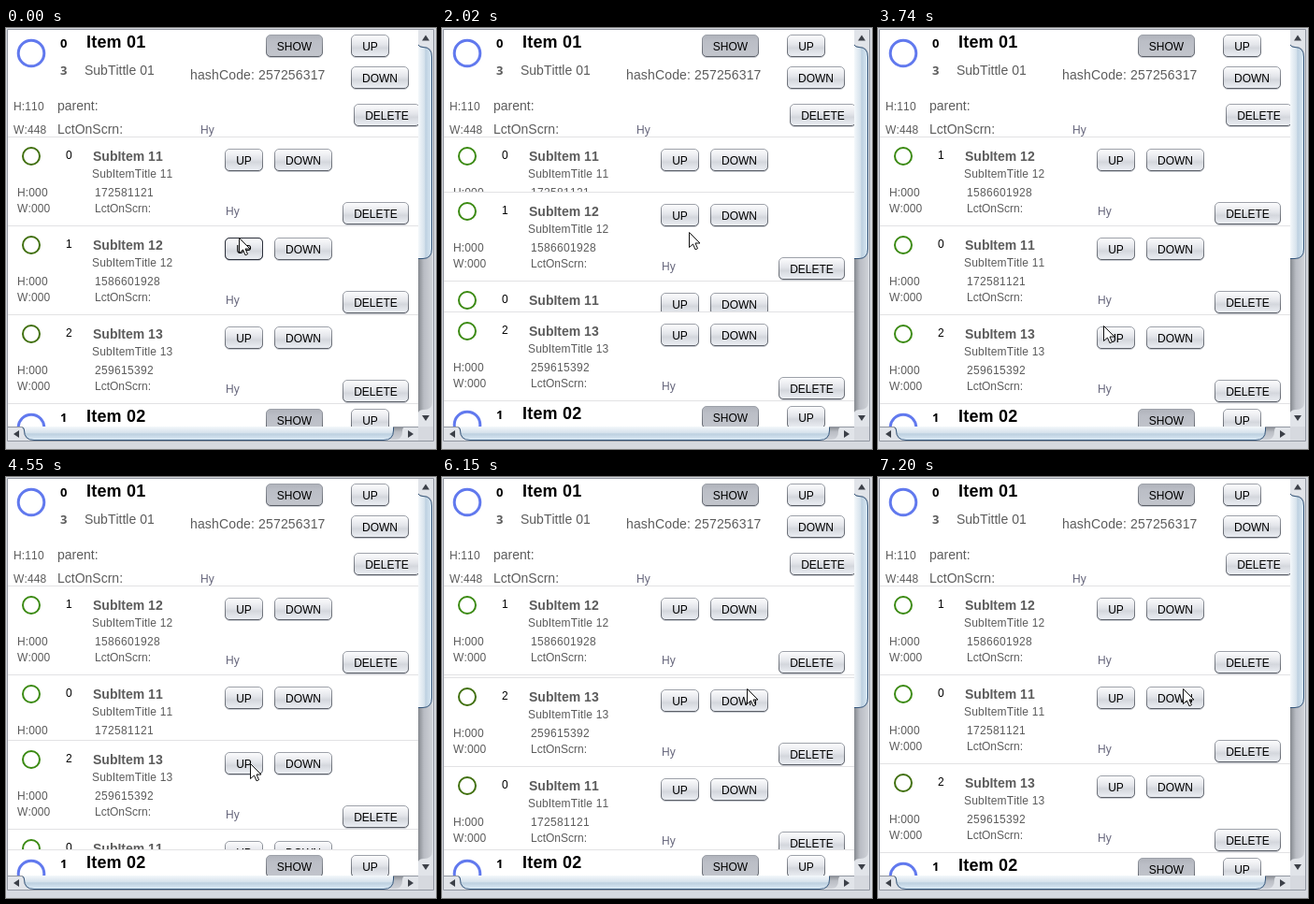
These frames come from a looping animation (460 by 450 pixels, 7800 ms). An HTML page:

```html
<!DOCTYPE html>
<html lang="en">
<head>
<meta charset="utf-8">
<title>Item list</title>
<style>
  html, body { margin: 0; width: 100%; height: 100%; overflow: hidden; background: #d6d9df; }
  svg { display: block; width: 460px; height: 450px; }
  text {
    font: 12px "Liberation Sans", Arial, sans-serif;
    font-kerning: none;
    fill: #5c5c5c;
    white-space: pre;
  }
  .mid { font-size: 14px; }
  .wide { letter-spacing: .15px; }
  .num { letter-spacing: .33px; }
  .title { font-size: 18px; font-weight: bold; fill: #000; letter-spacing: .2px; }
  .sub { font-size: 14px; font-weight: bold; }
  .index { font: bold 13px "Noto Sans", sans-serif; }
  .dark, .label { fill: #000; }
  .label { text-anchor: middle; }
  .hy { fill: #66667c; }
</style>
</head>
<body>
<svg viewBox="0 0 460 450">
  <defs>
    <linearGradient id="face" x2="0" y2="1">
      <stop stop-color="#fdfdfe"/><stop offset=".45" stop-color="#e3e5ea"/>
      <stop offset=".6" stop-color="#d4d7dd"/><stop offset="1" stop-color="#eceff4"/>
    </linearGradient>
    <linearGradient id="edge" x2="0" y2="1">
      <stop stop-color="#9da1a9"/><stop offset="1" stop-color="#5b5f67"/>
    </linearGradient>
    <linearGradient id="on" x2="0" y2="1">
      <stop stop-color="#b0b3bb"/><stop offset=".3" stop-color="#bbbec6"/><stop offset="1" stop-color="#c2c5cc"/>
    </linearGradient>
    <linearGradient id="down" x2="0" y2="1">
      <stop stop-color="#747983"/><stop offset=".3" stop-color="#9da2ab"/><stop offset="1" stop-color="#c3c7cf"/>
    </linearGradient>
    <linearGradient id="thumbH" x2="0" y2="1">
      <stop stop-color="#f4f8fb"/><stop offset=".45" stop-color="#d6e2ec"/>
      <stop offset=".55" stop-color="#bdd0e0"/><stop offset="1" stop-color="#dcebf6"/>
    </linearGradient>
    <linearGradient id="thumbV">
      <stop stop-color="#f4f8fb"/><stop offset=".45" stop-color="#d6e2ec"/>
      <stop offset=".55" stop-color="#bdd0e0"/><stop offset="1" stop-color="#dcebf6"/>
    </linearGradient>
    <linearGradient id="trackH" x2="0" y2="1">
      <stop stop-color="#85898f"/><stop offset=".4" stop-color="#b9bcc3"/><stop offset="1" stop-color="#cfd2d8"/>
    </linearGradient>
    <linearGradient id="trackV">
      <stop stop-color="#85898f"/><stop offset=".4" stop-color="#b9bcc3"/><stop offset="1" stop-color="#cfd2d8"/>
    </linearGradient>
    <clipPath id="view"><path d="M2 2H441V426H2Z"/></clipPath>
    <g id="shapes"></g>
  </defs>

  <path fill="#d6d9df" d="M0 0H460V450H0Z"/>
  <path fill="#fff" d="M2 2H441V426H2Z"/>
  <g id="list" clip-path="url(#view)"></g>

  <!-- vertical scroll bar -->
  <path fill="#e1e4e9" d="M441 2H457V426H441Z"/>
  <path fill="url(#trackV)" d="M441 17Q442 20 447 20Q456 20 456 28V400Q456 408 447 408Q442 408 441 411Z"/>
  <path fill="url(#thumbV)" d="M441 17Q442 20.500 446 20.500Q455.500 20.500 455.500 31V236Q455.500 246.500 446 246.500H441Z"/>
  <path fill="none" stroke="#35567b" d="M441 18Q442 20.500 446 20.500Q455.500 20.500 455.500 31V236Q455.500 246.500 446 246.500H441"/>
  <path fill="#3c4048" d="M445 13.500H453L449 7.500ZM445 414H453L449 420Z"/>

  <!-- horizontal scroll bar -->
  <path fill="#e1e4e9" d="M2 426H441V441H2Z"/>
  <path fill="url(#trackH)" d="M16 426Q19 427 19 431Q19 440 27 440H416Q424 440 424 431Q424 427 427 426Z"/>
  <path fill="url(#thumbH)" d="M16 426Q19.500 427 19.500 430Q19.500 440.500 30 440.500H404Q414.500 440.500 414.500 430V426Z"/>
  <path fill="none" stroke="#35567b" d="M17 426.500Q19.500 427 19.500 430Q19.500 440.500 30 440.500H404Q414.500 440.500 414.500 430V426"/>
  <path fill="#3c4048" d="M14 430V438L8 434ZM430 430V438L436 434Z"/>
  <path fill="#d6d9df" d="M441 426H457V441H441Z"/>
  <path fill="none" stroke="#9297a1" d="M1.500 441.500V1.500H457.500V441.500ZM2 426.500H18M414 426.500H441"/>

  <g id="hot"></g>
  <g id="pointer">
    <circle id="glow" cx="0" cy="2" r="12" fill="#f0e000" opacity=".6"/>
    <path fill="#fff" stroke="#111" d="M.5 .5V16.500L4.500 13L7 18.800L9.500 17.700L7 12H12Z"/>
  </g>
</svg>
<script>
  const $ = id => document.getElementById(id);
  const LOOP = 7800, TICK = 70, ROW = 95, TOP = 116, SPEED = .09, LAG = 3;
  const DARK_EDGE = '#2b2f3a';

  const text = (x, y, s, cls = '') => `<text x="${x}" y="${y}" class="${cls}">${s}</text>`;
  const ring = (y, r, w, color) =>
    `<circle cx="27" cy="${y}" r="${r}" fill="none" stroke="${color}" stroke-width="${w}"/>`;
  const box = (x, y, w, fill, edge) =>
    `<rect x="${x + .5}" y="${y + .5}" width="${w}" height="23" rx="4.500" fill="${fill}" stroke="${edge}"/>`;
  const button = (x, y, w, s, face = 'face', edge = 'url(#edge)') =>
    box(x, y + 1, w, 'none', '#c9ccd2') + box(x, y, w, `url(#${face})`, edge) +
    text(x + w / 2 + .5, y + 17, s, 'label');
  const panel = (y, h) =>
    `<path fill="#fff" d="M2 ${y}h440v${h}h-440z"/><path fill="#e2e2e4" d="M2 ${y}h440v1h-440z"/>`;

  const header = (index, title) => panel(1, 116) + ring(27, 13.8, 3, '#6179ee') +
    text(58, 21, index, 'index dark') + text(86, 21, title, 'title') +
    text(58, 50, 3, 'index') + text(84, 50, 'SubTittle 01', 'mid') +
    text(197, 55, 'hashCode: 257256317', 'mid wide') +
    text(8, 88, 'H:110', 'wide') + text(55, 88, 'parent:', 'mid') +
    text(8, 113, 'W:448', 'wide') + text(55, 113, 'LctOnScrn:', 'mid') + text(208, 113, 'Hy', 'hy') +
    button(278, 7, 60, 'SHOW', 'on') + button(369, 7, 40, 'UP') +
    button(369, 41, 61, 'DOWN') + button(372, 81, 70, 'DELETE');

  const BUTTONS = [{ x: 234, w: 40, s: 'UP' }, { x: 287, w: 61, s: 'DOWN' }];
  const cell = (id, index, hash) => `<g id="s${id}">` + panel(0, ROW + 1) +
    ring(21, 9, 2, 'currentColor') + text(64, 24, index, 'dark') +
    text(93, 26, 'SubItem ' + id, 'sub') + text(92, 44, 'SubItemTitle ' + id, 'wide') +
    text(12, 64, 'H:000', 'wide') + text(95, 64, hash, 'num') +
    text(12, 81, 'W:000', 'wide') + text(95, 81, 'LctOnScrn:') + text(235, 84, 'Hy', 'hy') +
    BUTTONS.map(b => button(b.x, 13, b.w, b.s)).join('') + button(360, 70, 70, 'DELETE') + '</g>';

  $('shapes').innerHTML = cell(11, 0, 172581121) + cell(12, 1, 1586601928) + cell(13, 2, 259615392);
  $('list').innerHTML = header(0, 'Item 01') + '<use/>'.repeat(4) +
    `<g id="next">${header(1, 'Item 02')}</g>`;
  const slots = [...$('list').querySelectorAll('use')];

  // Each swap collapses one copy of a row while another copy grows.
  // The picture refreshes in ticks counted from grid.
  const MOVES = [
    { press: 1535, show: 1670, grid: 1655, start: 1600, rows: [11, 12, 11, 13], out: 0, into: 2, row: 1, b: 0 },
    { press: 4205, show: 4335, grid: 4335, start: 4262, rows: [12, 11, 13, 11], out: 1, into: 3, row: 2, b: 0 },
    { press: 6075, show: 6145, grid: 6145, start: 6083, rows: [12, 11, 13, 11], out: 3, into: 1, row: 1, b: 1 }
  ];

  // time, x, y of the pointer tip
  const PATH = [
    [0, 249, 224], [560, 249, 224], [830, 254, 267], [1070, 254, 233], [1655, 254, 233],
    [2490, 278, 198], [2690, 313, 152], [2890, 313, 152], [3320, 286, 339], [3560, 229, 326],
    [3670, 241, 318], [3860, 241, 318], [4130, 252, 327], [4330, 252, 327], [5030, 281, 258],
    [5320, 281, 258], [5790, 326, 226], [LOOP, 326, 226]
  ];

  const clamp = v => Math.max(0, Math.min(ROW, v));

  function tip(t) {
    const i = PATH.findIndex(p => p[0] > t);
    const [t0, x0, y0] = PATH[i - 1], [t1, x1, y1] = PATH[i];
    const k = (t - t0) / (t1 - t0);
    return [Math.round(x0 + (x1 - x0) * k), Math.round(y0 + (y1 - y0) * k)];
  }

  function hotButton(x, y) {
    const row = Math.floor((y - TOP) / ROW), dy = y - TOP - row * ROW;
    const b = BUTTONS.find(b => x >= b.x && x <= b.x + b.w);
    return b && row >= 0 && row < 3 && dy >= 13 && dy <= 37
      ? box(b.x, TOP + row * ROW + 13, b.w, 'none', DARK_EDGE) : '';
  }

  let hotNow = '';
  function draw(now) {
    const t = now % LOOP;
    const move = MOVES.filter(m => t >= m.show).pop() || MOVES[0];
    const step = Math.max(0, move.grid + Math.floor((t - move.grid) / TICK) * TICK);
    const run = t < move.show ? 0 : SPEED * (step - move.start);

    let y = TOP;
    slots.forEach((slot, i) => {
      const bright = t >= MOVES[0].show && !(move === MOVES[2] && i > 1);
      slot.setAttribute('href', '#s' + move.rows[i]);
      slot.setAttribute('y', Math.round(y));
      slot.style.color = bright ? '#3b8a12' : '#41700f';
      y += i === move.out ? ROW - clamp(run) : i === move.into ? clamp(run - LAG) : ROW;
    });
    $('next').setAttribute('transform', `translate(0 ${Math.round(y) - 1})`);

    const [px, py] = tip(step);
    $('pointer').setAttribute('transform', `translate(${px} ${py})`);

    const click = MOVES.find(m => t >= m.press && t < m.show);
    $('glow').style.display = click ? '' : 'none';
    let hot = '';
    if (click) {
      const b = BUTTONS[click.b], by = TOP + click.row * ROW + 13;
      hot = `<rect x="${b.x - .5}" y="${by - .5}" width="${b.w + 2}" height="25" rx="5.500" fill="none" stroke="#73a4d1" stroke-width="2"/>` +
        button(b.x, by, b.w, b.s, 'down', DARK_EDGE);
    } else if (t < MOVES[2].press && (run <= 0 || run >= ROW + LAG)) {
      hot = hotButton(px, py);
    }
    if (hot !== hotNow) $('hot').innerHTML = hotNow = hot;
  }

  const begin = performance.now();
  function tick() {
    draw(performance.now() - begin);
    requestAnimationFrame(tick);
  }
  tick();
</script>
</body>
</html>
```
